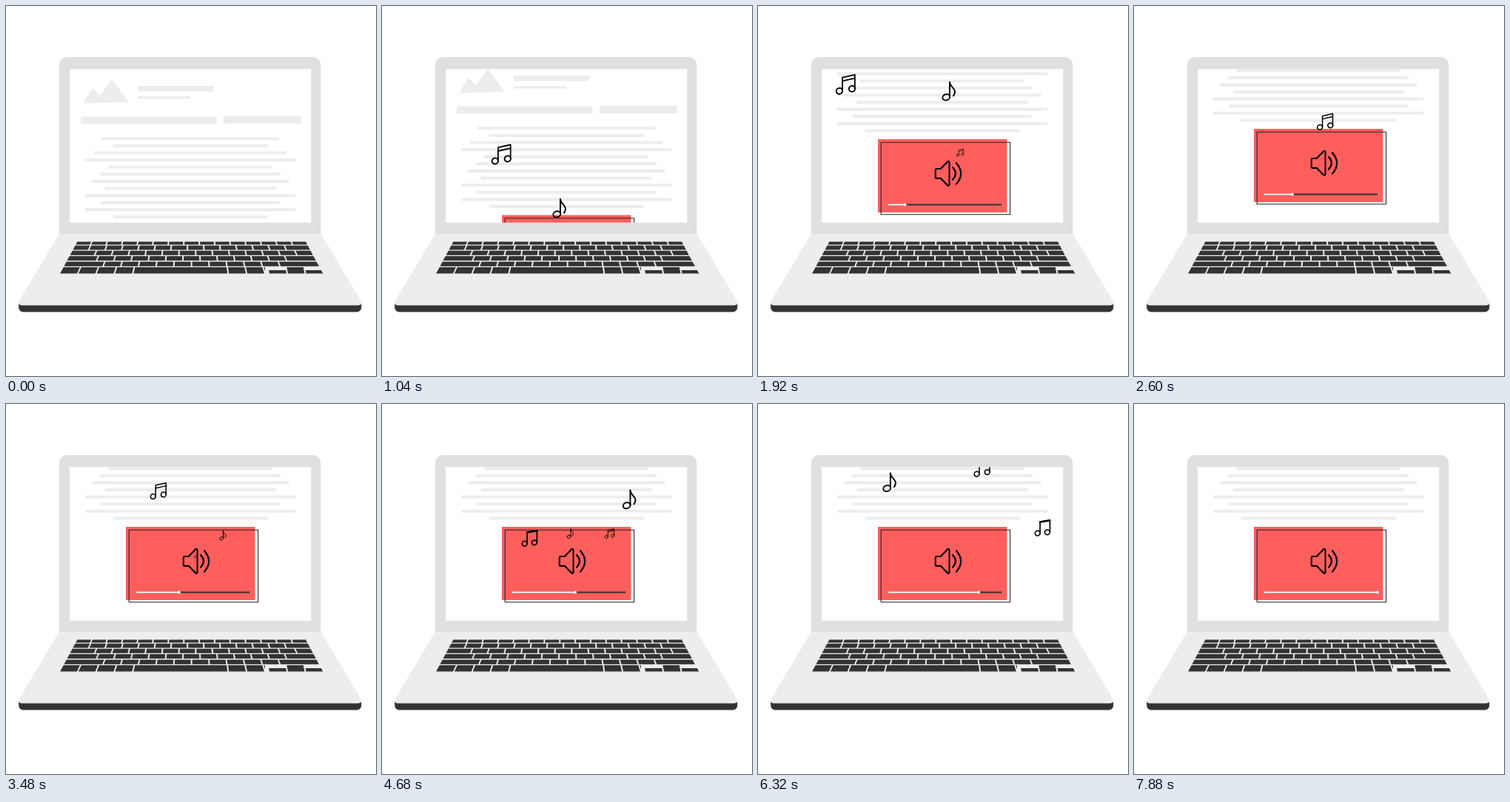
An HTML page with a canvas that plays this animation: 500 px wide and 500 px high, repeating every 8.96 s.

```html
<!DOCTYPE html>
<html lang="en">
<head>
<meta charset="utf-8">
<title>Laptop music</title>
<style>
  html, body { margin: 0; width: 100%; height: 100%; overflow: hidden; background: #fff; }
  canvas { display: block; width: 500px; height: 500px; }
</style>
</head>
<body>
<canvas id="stage"></canvas>
<script>
const LOOP = 8960, STEP = 40;
const SCROLL = { from: 920, to: 2040, dist: 130.5 };
const PLAY = { from: 920, to: 7680 };
const INK = '#333', PALE = '#ededed', BEZEL = '#e0e0e0', RED = '#ff5f5c';
const SCREEN = [86, 85.3, 326.3, 207.4];
const HALF_WIDTHS = [120, 104.5, 130.5, 142, 111, 122, 133.5, 115.5, 142, 121, 142, 104.5];

const canvas = document.getElementById('stage');
const ctx = canvas.getContext('2d');
const dpr = window.devicePixelRatio || 1;
canvas.width = canvas.height = 500 * dpr;

// Every note follows p + v*t + a*t*t, with t in seconds since its birth.
const note = (kind, born, v, a, p) => ({ kind, born, v, a, p });

// Crossing the page before the player arrives, at full size
const passing = [
  note('beam', 0, [-10, -259], [0, 0], [407, 303]),
  note('twin', 0, [52, -107.5], [-34, 0], [144, 312]),
  note('single', 800, [5.7, -158], [10.9, -16], [238, 312])
];

// Rising from the loudspeaker, growing as they go
const rising = [
  note('twin', 1350, [22.6, -37.4], [-24.3, -2]),
  note('single', 2700, [31, -35], [1.3, -2], [268, 206]),
  note('beam', 3260, [-60.7, 7.3], [9, -17.3]),
  note('twin', 3930, [70, -37.4], [-23.2, -5.2]),
  note('single', 3930, [-9, -41], [-12, -.4]),
  note('beam', 4720, [104, -2.8], [-19.3, -13.3])
];

const progress = (t, { from, to }) => Math.min(1, Math.max(0, (t - from) / (to - from)));

function rect(x1, y1, x2, y2, color) {
  ctx.fillStyle = color;
  ctx.fillRect(x1, y1, x2 - x1, y2 - y1);
}

function fill(color, build) {
  ctx.fillStyle = color;
  ctx.beginPath();
  build();
  ctx.closePath();
  ctx.fill();
}

const poly = (points, color) => fill(color, () => points.forEach(p => ctx.lineTo(...p)));

function stroke(width, build) {
  ctx.lineWidth = width;
  ctx.beginPath();
  build();
  ctx.stroke();
}

const head = (x, y, rx = 4.2) =>
  stroke(1.9, () => ctx.ellipse(x, y, rx, 4, -.35, 0, 2 * Math.PI));

const line = (width, ...points) => stroke(width, () => points.forEach(p => ctx.lineTo(...p)));

const SHAPES = {
  twin() {
    head(-8.5, 9.3);
    head(8.5, 6.2);
    line(1.8, [-4.4, 9], [-4.4, -9], [12.4, -12.7], [12.4, 6]);
    line(1.8, [-4.4, -4.2], [12.4, -8]);
  },
  beam() {
    head(-8.6, 8.6);
    head(7.2, 7);
    line(2.1, [-4.6, 8], [-4.6, -10], [11.4, -12.6], [11.4, 6.5]);
    line(3, [-4.6, -9.6], [11.4, -12.2]);
  },
  single() {
    head(-3.7, 8.3, 5);
    line(1.9, [1, 7.5], [1, -12.3]);
    stroke(1.9, () => {
      ctx.moveTo(1, -12);
      ctx.bezierCurveTo(1.5, -4.5, 12.5, -3, 6, 6.5);
    });
  }
};

function drawNote({ kind, born, v, a, p = [268, 206] }, t, grows) {
  const age = (t - born) / 1000;
  if (age <= 0) return;
  const [x, y] = p.map((c, i) => c + v[i] * age + a[i] * age * age);
  const size = grows ? Math.min(kind === 'single' ? 1 : .83, age / 1.5) : 1;
  ctx.save();
  ctx.translate(x, y);
  ctx.scale(size, size);
  ctx.strokeStyle = '#000';
  SHAPES[kind]();
  ctx.restore();
}

function drawArticle() {
  poly([[104, 131.5], [117, 111], [127, 121], [143, 99], [166, 130]], PALE);
  rect(178, 108, 280.5, 115.5, PALE);
  rect(178, 122, 249.5, 125.5, PALE);
  rect(101, 149.5, 284.5, 159.5, PALE);
  rect(294, 149, 399, 159, PALE);
  HALF_WIDTHS.forEach((half, i) => {
    const y = 179.3 + 9.6 * i;
    rect(249 - half, y - 2, 249 + half, y + 2, PALE);
  });
}

function drawSpeaker() {
  ctx.strokeStyle = '#000';
  stroke(2.2, () => {
    ctx.moveTo(239.8, 212.4);
    ctx.arcTo(239.8, 206, 246.5, 206, 1.8);
    ctx.lineTo(246.8, 206);
    ctx.arcTo(258.6, 193.8, 258.6, 212.4, 1.5);
    ctx.arcTo(258.6, 231, 246.8, 218.8, 1.5);
    ctx.lineTo(246.8, 218.8);
    ctx.arcTo(239.8, 218.8, 239.8, 212.4, 1.8);
    ctx.closePath();
  });
  for (const [x, h, bulge] of [[263, 8.3, 8], [268, 14.2, 12.4]]) {
    stroke(2.2, () => {
      ctx.moveTo(x, 212.4 - h);
      ctx.quadraticCurveTo(x + bulge, 212.4, x, 212.4 + h);
    });
  }
}

function drawPlayer(t) {
  rect(162, 166, 336.5, 265, RED);
  ctx.strokeStyle = '#222';
  ctx.lineWidth = 1.1;
  ctx.strokeRect(166.2, 170.2, 174.5, 97.5);
  const x = 176 + 153 * progress(t, PLAY);
  rect(176, 253.5, 329, 255.5, INK);
  rect(176, 253.5, x, 255.5, '#fff');
  fill('#fff', () => ctx.arc(x, 254.5, 1.9, 0, 2 * Math.PI));
  drawSpeaker();
}

// One key on the slanted board; a and b run from 0 to 1 across it
function key(a, b, y1, y2) {
  const at = (u, y) => 250.7 + (u * 2 - 1) * (155.6 + (y - 319) * .54);
  poly([[at(a, y1) + 1, y1], [at(b, y1) - 1, y1], [at(b, y2) - 1, y2], [at(a, y2) + 1, y2]], INK);
}

function keyRow(widths, y1, y2) {
  const total = widths.reduce((sum, w) => sum + w);
  let u = 0;
  for (const w of widths) key(u / total, (u += w) / total, y1, y2);
}

function drawKeyboard() {
  const ends = [[1, 1], [1, 1.5], [1.5, 1], [1.75, 1.75], [2.25, 2.25]];
  let y = 318.6;
  ends.forEach(([first, last], i) => {
    const height = i ? 5.4 + .25 * i : 3.9;
    const count = Math.round(14.5 - first - last);
    keyRow([first, ...Array(count).fill(1), last], y, y + height);
    y += height + 1.3;
  });
  keyRow([1, 1, 1, 1, 5.2, 1, 1, 3.2], y, 361.5);
  // Arrow keys: the outer two are half as tall
  const left = 1 - 3.2 / 14.4;
  rect(350, y - .3, 378, 357, PALE);
  rect(402.5, y - .3, 427, 357, PALE);
  poly([[350, 352.8], [354.5, 352.8], [356, 362], [350, 362]], PALE);
  for (const x of [378.5, 403]) line2(x, y);
}

function line2(x, y) {
  ctx.strokeStyle = PALE;
  line(2, [x, y], [x + 1.5, 361.5]);
}

function drawLaptop() {
  fill(INK, () => ctx.roundRect(17.2, 401, 463, 12.4, [0, 0, 6, 6]));
  fill(PALE, () => {
    ctx.moveTo(73, 306);
    ctx.lineTo(424.5, 306);
    ctx.lineTo(479, 397.5);
    ctx.quadraticCurveTo(483.5, 404.5, 474, 404.5);
    ctx.lineTo(23, 404.5);
    ctx.quadraticCurveTo(14, 404.5, 18.5, 397.5);
  });
  fill(BEZEL, () => ctx.roundRect(72, 69, 353.3, 238.7, [10, 10, 2, 2]));
  fill('#fff', () => ctx.rect(...SCREEN));
  drawKeyboard();
}

function draw(t) {
  ctx.setTransform(dpr, 0, 0, dpr, 0, 0);
  rect(0, 0, 500, 500, '#fff');
  ctx.lineJoin = ctx.lineCap = 'round';
  drawLaptop();
  ctx.save();
  ctx.beginPath();
  ctx.rect(...SCREEN);
  ctx.clip();
  ctx.save();
  ctx.translate(0, -SCROLL.dist * progress(t, SCROLL));
  drawArticle();
  ctx.translate(0, SCROLL.dist);
  drawPlayer(t);
  rising.forEach(n => drawNote(n, t, true));
  ctx.restore();
  passing.forEach(n => drawNote(n, t, false));
  ctx.restore();
}

const start = performance.now();
function tick() {
  const t = (performance.now() - start) % LOOP;
  draw(Math.floor(t / STEP) * STEP);
  requestAnimationFrame(tick);
}
tick();
</script>
</body>
</html>
```
